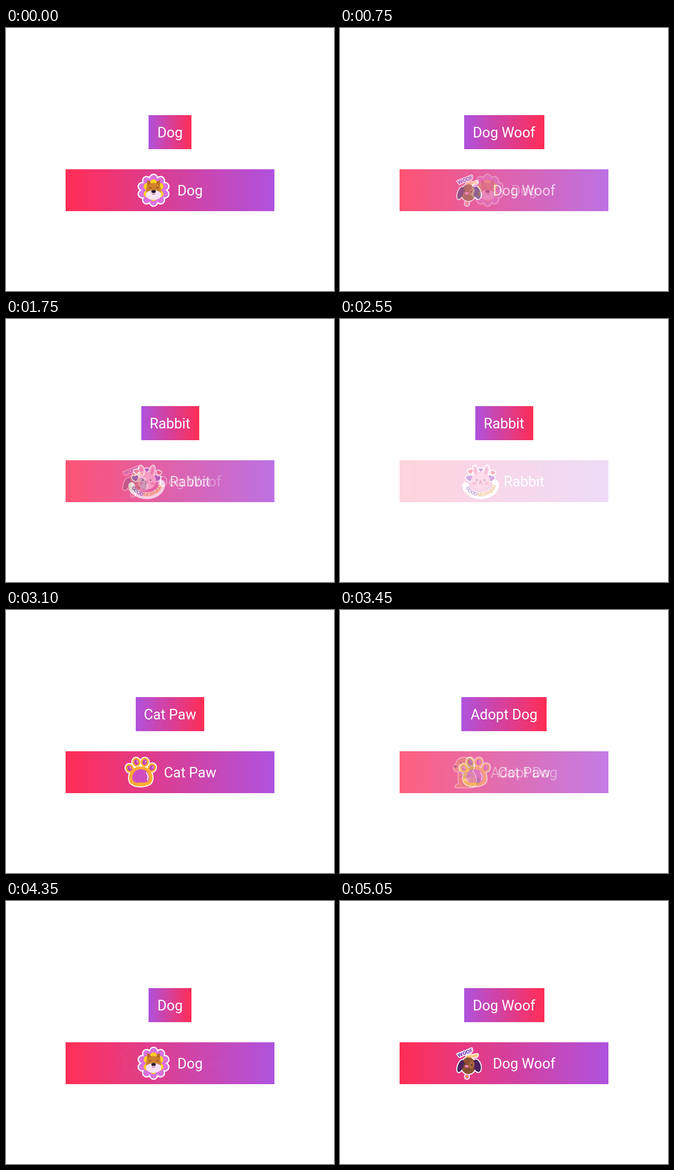
These frames come from a looping animation (589 px wide and 471 px high, 5100 ms). An HTML page:

```html
<!DOCTYPE html>
<html lang="en">
<head>
<meta charset="utf-8">
<title>Sticker buttons</title>
<style>
  html, body { margin: 0; width: 100%; height: 100%; overflow: hidden; background: #fff; }
  svg { display: block; }
  .label { font: 25.5px Roboto, Inter, sans-serif; fill: #fff; text-anchor: middle; }
  .lettering { font-family: Inter, sans-serif; font-weight: 800; text-anchor: middle; }
  .rim * {
    fill: #fff; stroke: #fff; stroke-width: 3.6; stroke-linejoin: round;
    vector-effect: non-scaling-stroke;
  }
</style>
</head>
<body>
<svg width="589" height="471" viewBox="0 0 589 471">
  <defs>
    <linearGradient id="toPink"><stop stop-color="#af52de"/><stop offset="1" stop-color="#ff2d55"/></linearGradient>
    <linearGradient id="toPurple"><stop stop-color="#ff2d55"/><stop offset="1" stop-color="#af52de"/></linearGradient>
    <path id="smile" d="M-26 9 A27 20 0 0 0 28 5"/>
    <g id="cards"></g>
  </defs>
  <rect id="box" y="156" height="61" fill="url(#toPink)"/>
  <text id="title" class="label" x="294.5" y="196"></text>
  <use id="back"/>
  <use id="front"/>
</svg>
<script>
const $ = id => document.getElementById(id);
const oval = (x, y, rx, ry, fill, turn = 0) =>
  `<ellipse cx="${x}" cy="${y}" rx="${rx}" ry="${ry}" fill="${fill}" transform="rotate(${turn} ${x} ${y})"/>`;
const shape = (d, fill) => `<path d="${d}" fill="${fill}"/>`;
const line = (d, color, width = 1) =>
  `<path d="${d}" fill="none" stroke="${color}" stroke-width="${width}" stroke-linecap="round"/>`;
const word = (text, x, y, size, fill, turn) =>
  `<text class="lettering" font-size="${size}" fill="${fill}" transform="translate(${x} ${y}) rotate(${turn})">${text}</text>`;
const heart = (x, y, size, fill, turn = 0) =>
  `<path transform="translate(${x} ${y}) rotate(${turn}) scale(${size})" fill="${fill}"
    d="M0 1 C-1.6 0 -1.2 -1 -.5 -1 Q0 -1 0 -.5 Q0 -1 .5 -1 C1.2 -1 1.6 0 0 1"/>`;
const ring = (count, draw) => Array.from({ length: count }, (_, i) =>
  `<g transform="rotate(${i * 360 / count})">${draw}</g>`).join('');
const rimmed = art => `<g class="rim">${art}</g>${art}`;

const flowerDog =
  ring(10, oval(0, -20.5, 8.6, 9.3, '#fff')) +
  ring(10, oval(0, -19.5, 6.6, 8, '#db70df')) +
  ring(6, oval(0, -13, 6.3, 6.5, '#ffd21f')) +
  shape('M-12 -3 L-11 -18 Q-6 -17 -4 -11 Q0 -12 4 -11 Q6 -17 11 -18 L12 -3 Z', '#b9681f') +
  oval(0, 0, 13.5, 13, '#cf812c') +
  oval(0, 8.5, 14, 8.7, '#f8e3f6') +
  line('M-9 -4 Q-6.5 -6.5 -4 -4 M4 -4 Q6.5 -6.5 9 -4', '#633423') +
  oval(0, 2.3, 4, 2.8, '#2b1626') +
  line('M-3 6.5 Q0 9 3 6.5', '#a43d72');

const woofDog = rimmed(
  word('WOOF', -5.5, -15.5, 9, '#7130bd', -22) +
  word('WOOF', 6, -10, 6.8, '#ff9d22', -8) +
  oval(-3.5, 24, 3.6, 4, '#e477c7') +
  oval(-1, 4.5, 13, 15, '#8b5132') +
  oval(-15, 5, 4.8, 11.5, '#4b235d', 20) +
  oval(14.5, 4.5, 6.5, 11.5, '#4b235d', -17)) +
  oval(5, 3, 5, 7, '#a9663e', 15) +
  oval(5, 3, 1, 1.5, '#2e1627') + oval(-8, 1, 1, 1.5, '#2e1627') +
  oval(-4, 5.5, 3.4, 2.3, '#f184bc') +
  line('M-7 11 Q-2 13.5 3 11', '#6b3a2c') +
  heart(-3.5, 24, 2, '#ff9d22');

const rabbit = rimmed(
  oval(-8, -18, 4.6, 10, '#fa9bc4', -12) + oval(11, -18, 4.6, 10, '#fa9bc4', 12) +
  heart(-17, -17, 3.8, '#ef3864', -15) + heart(23, -15, 3.6, '#ef3864', 18) +
  heart(-19, -5, 5.2, '#8c35ba', -12) + heart(20, -5, 5.2, '#8c35ba', 15) +
  heart(1.5, -20, 3.2, '#8c35ba')) +
  '<use href="#smile" fill="none" stroke="#fff" stroke-width="12" stroke-linecap="round" transform="translate(0 -1)"/>' +
  oval(1, -1, 17, 16, '#fca9ca') +
  oval(-8, -18, 2, 6.5, '#ee669f', -12) + oval(11, -18, 2, 6.5, '#ee669f', 12) +
  oval(-10, 4, 4, 3, '#f675a6') + oval(12, 4, 4, 3, '#f675a6') +
  oval(-6, -2, 1.2, 1.7, '#4a2450') + oval(8, -2, 1.2, 1.7, '#4a2450') +
  oval(1, .5, 2.5, 1.8, '#d13a7b') +
  line('M-2 4 Q-.5 6 1 3 Q2.5 6 4 4', '#8f315f') +
  line('M-26 6 A27 20 0 0 0 28 2', '#fff', 8.5) +
  `<text class="lettering" font-size="8.8"><textPath href="#smile" startOffset="50%">` +
  `<tspan fill="#8135b2">GOOD</tspan><tspan fill="#f28b35">MORNING</tspan></textPath></text>`;

const toes = [[-20, -7, -28], [-8, -18, -10], [7, -18, 10], [20, -8, 28]];
const catPaw = rimmed(
  toes.map(([x, y, turn]) => oval(x, y, 7.2, 8, '#ffac32', turn)).join('') +
  shape('M-17 -4 Q0 -17 17 -4 Q25 11 18 20 Q10 26 0 25 Q-12 26 -19 19 Q-24 9 -17 -4', '#ffac32')) +
  toes.map(([x, y, turn]) => oval(x, y, 4, 5.2, '#bd45b4', turn) +
    oval(x + 1.5, y - 1, .8, 2.6, '#f6b2ed', turn)).join('') +
  shape('M-9 -3 Q0 -8 9 -3 Q18 6 14 15 Q9 20 0 18 Q-9 21 -14 15 Q-18 6 -9 -3', '#d04dc0') +
  line('M10 1 Q15 7 12 14', '#fff', 1.8);

const adoptDog = rimmed(
  line('M16 21 Q24 20 21 11', '#713243', 5) +
  shape('M-12 -5 L7 -6 Q19 6 18 21 Q15 28 2 27 L-19 27 Q-21 23 -13 21 Q-16 7 -12 -5', '#e58a39') +
  oval(-5, -14, 13, 12, '#e58a39') +
  oval(-15, -8, 8, 7, '#edab65') +
  oval(7, -14, 6, 12, '#804052', -12)) +
  oval(-20, -10, 3, 2.2, '#3c1d32') + oval(-10, -17, 1.5, 2, '#3c1d32') +
  line('M-11 0 Q0 4 8 -1', '#9a42bb', 3) +
  word('ADOPT', 1, 9, 6.5, '#7931a8', -4) +
  word('ME', 1, 16, 6.5, '#fff', -4) +
  line('M-5 18 L-5 25 M6 19 Q1 20 2 26', '#a8562c', 1.3);

// Label, width of its upper box, sticker.
const pets = [
  ['Dog', 77, flowerDog],
  ['Dog Woof', 144, woofDog],
  ['Rabbit', 104, rabbit],
  ['Cat Paw', 123, catPaw],
  ['Adopt Dog', 153, adoptDog]
];

$('cards').innerHTML = pets.map(([name, width, art], i) => `
  <g id="card${i}">
    <rect x="107" y="253" width="375" height="75" fill="url(#toPurple)"/>
    <g id="sticker${i}"><g transform="translate(${303.5 - width / 2} 290.5)">${art}</g></g>
    <text class="label" x="330.5" y="300">${name}</text>
  </g>`).join('');

const LOOP = 5100, PRESS = 45, DIM = .2, SPEED = .0173;
const taps = [550, 1550, 2550, 3300, 3950, 4500];

const settle = ms => 1 - (1 + SPEED * ms) * Math.exp(-SPEED * ms);

function show(layer, id, opacity) {
  layer.setAttribute('href', '#' + id);
  layer.setAttribute('opacity', opacity);
}

function render(time) {
  const count = taps.filter(tap => tap <= time).length;
  const since = count ? time - taps[count - 1] : Infinity;
  const pressed = since < PRESS;
  const next = count % pets.length;
  const previous = (count + pets.length - 1) % pets.length;
  const [name, width] = pets[pressed ? previous : next];

  $('title').textContent = name;
  $('box').setAttribute('x', Math.round(294.5 - width / 2));
  $('box').setAttribute('width', width);

  if (pressed) {
    show($('back'), 'card' + previous, DIM);
    show($('front'), 'sticker' + previous, .25);
  } else {
    // The outgoing card fades away above the incoming one.
    const shown = since > 520 ? 1 : settle(since - PRESS);
    show($('back'), 'card' + next, shown);
    show($('front'), 'card' + previous, 1 - shown);
  }
}

function tick() {
  render(performance.now() % LOOP);
  requestAnimationFrame(tick);
}
tick();
</script>
</body>
</html>
```
